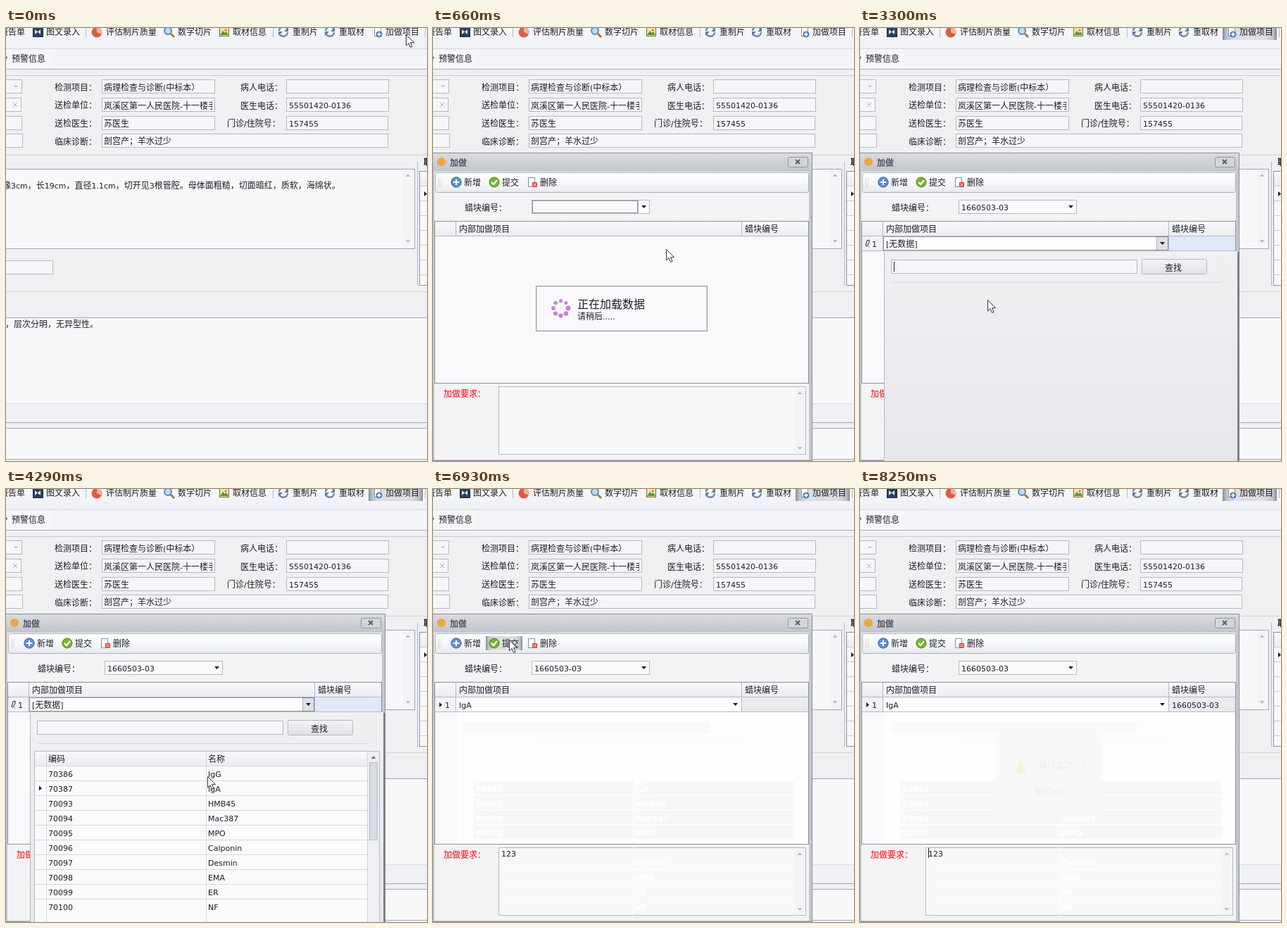
An HTML page for the animation above (8.58 s loop, 598 px wide and 615 px high).

```html
<!DOCTYPE html>
<html lang="zh">
<head>
<meta charset="utf-8">
<style>
html, body { margin: 0; width: 100%; height: 100%; overflow: hidden; background: #f0eff2; }
svg { display: block; }
text { fill: #1c1c26; white-space: pre; font: 12px "Noto Sans CJK SC", "Noto Sans CJK", sans-serif; }
.a { font-family: "DejaVu Sans", sans-serif; font-size: .917em; }
</style>
</head>
<body>
<svg id="stage" width="598" height="615" viewBox="0 0 598 615">
<defs>
  <linearGradient id="bar" x2="0" y2="1"><stop stop-color="#f6f7f9"/><stop offset="1" stop-color="#eff0f4"/></linearGradient>
  <linearGradient id="tool" x2="0" y2="1"><stop stop-color="#fff"/><stop offset=".5" stop-color="#f6f7f9"/><stop offset="1" stop-color="#e8eaef"/></linearGradient>
  <linearGradient id="button" x2="0" y2="1"><stop stop-color="#f3f3f6"/><stop offset="1" stop-color="#dfe1e7"/></linearGradient>
  <linearGradient id="title" x2="0" y2="1"><stop stop-color="#d9dbe0"/><stop offset="1" stop-color="#c2c5cc"/></linearGradient>
  <linearGradient id="head" x2="0" y2="1"><stop stop-color="#f9f9fb"/><stop offset="1" stop-color="#ebecf0"/></linearGradient>
  <linearGradient id="panel" x2="0" y2="1"><stop stop-color="#f0f0f3"/><stop offset="1" stop-color="#e6e7eb"/></linearGradient>
  <linearGradient id="hot"><stop stop-color="#878a92"/><stop offset=".07" stop-color="#bfc2c9"/><stop offset=".22" stop-color="#dcdee3"/><stop offset=".78" stop-color="#dcdee3"/><stop offset=".93" stop-color="#bfc2c9"/><stop offset="1" stop-color="#878a92"/></linearGradient>
</defs>
<g id="scene"></g>
</svg>
<script>
const STEP = 330, STEPS = 26;
const LINE = '#b4b9c4', DARK = '#8b909b', EDGE = '#9ea5b3', INK = '#1c1c26';

const rect = (x, y, w, h, fill, stroke, extra = '') =>
  `<rect x="${stroke ? x + .5 : x}" y="${stroke ? y + .5 : y}" width="${w}" height="${h}" fill="${fill}" ${stroke ? `stroke="${stroke}"` : ''} ${extra}/>`;
const path = (d, stroke, fill = 'none', extra = '') => `<path d="${d}" stroke="${stroke}" fill="${fill}" ${extra}/>`;
const circle = (x, y, r, fill, extra = '') => `<circle cx="${x}" cy="${y}" r="${r}" fill="${fill}" ${extra}/>`;
const hline = (x, x2, y, c = LINE) => rect(x, y, x2 - x, 1, c);
const vline = (x, y, y2, c = LINE) => rect(x, y, 1, y2 - y, c);
const at = (x, y, s) => `<g transform="translate(${x} ${y})">${s}</g>`;
// Text centred vertically on cy, on a whole-pixel baseline; Latin runs use a smaller sans face.
const text = (x, cy, s, style = '') =>
  `<text x="${x}" y="${Math.round(cy + 4.5)}" style="${style}">${s.replace(/[ -~]+/g, m => `<tspan class="a">${m}</tspan>`)}</text>`;
const field = (x, y, w, h = 19) => rect(x, y, w, h, '#f6f6f9', LINE);
const down = (x, y, c = INK, k = 1) => path(`M${x - 3.5} ${y - 2 * k}h7l-3.5 ${4 * k}z`, 'none', c);
const pointer = (x, y) => path(`M${x} ${y - 3.5}v7l4-3.5z`, 'none', INK);
const dotted = (x, y, w, h) => rect(x, y, w, h, 'none', '#333', 'stroke-dasharray="1 1"');
const scroller = (x, y1, y2) => rect(x - 7, y1 - 7, 15, y2 - y1 + 14, '#f4f4f6') + down(x, y1, '#b9bdc6', -1) + down(x, y2, '#b9bdc6');

const refresh = (x, y) => at(x, y,
  path('M-6-1a6 6 0 0 1 11-3M6 1a6 6 0 0 1-11 3', '#7189ad', 'none', 'stroke-width="2.4"') +
  path('M7-6v6h-6zM-7 6v-6h6z', 'none', '#5a78a8'));
const plus = (x, y, r) => circle(x, y, r, '#5b8fd0', 'stroke="#3c67a5"') +
  path(`M${x - r * .6} ${y}h${r * 1.2}M${x} ${y - r * .6}v${r * 1.2}`, '#fff', 'none', 'stroke-width="2"');
const check = (x, y) => circle(x, y, 7, '#78b52c', 'stroke="#4c8317"') +
  path(`M${x - 4} ${y}l3 3l5-6`, '#fff', 'none', 'stroke-width="2.2"');
const pageDelete = (x, y) => rect(x - 6, y - 7, 9, 13, '#fff', '#8190a8') + rect(x, y, 7, 7, '#dc4a3e') +
  path(`M${x + 1.5} ${y + 1.5}l4 4m0-4l-4 4`, '#fff');

function toolbarIcons() {
  return rect(38, -2, 14, 14, '#29405f', '#1d2c44') + path('M41 2l8 7v-7l-8 7z', 'none', '#dfe9f5') +
    circle(129, 6, 7.5, '#d9603f') + path('M129 6V-2a8 8 0 0 1 7 11z', 'none', '#e9b49d') +
    path('M234 8l5 5', '#a87a3c', 'none', 'stroke-width="3"') + circle(230, 4, 5, '#b9dbf4', 'stroke="#6488b4" stroke-width="2"') +
    rect(303, -1, 13, 12, '#f3e6a4', '#7d6a35') + path('M304 10l4-6 3 3 2-2 3 5z', 'none', '#4f9440') + circle(312, 3, 1.5, '#e2692f') +
    refresh(394, 5) + refresh(460, 5) +
    rect(523, -2, 9, 13, '#fff', '#8190a8') + plus(530, 9, 4);
}

function backdrop(hot) {
  let s = rect(0, 0, 598, 615, '#f0eff2') + rect(0, 0, 598, 29, 'url(#bar)') + hline(0, 598, 29, '#d6d9e0') +
    rect(0, 30, 598, 28, '#f3f4f7') + rect(0, 31, 63, 27, '#f6f6f9') + hline(0, 598, 58, '#a4abba');
  if (hot) s += rect(515, 0, 77, 17, 'url(#hot)');
  s += toolbarIcons();
  [[-9, '报告单'], [57, '图文录入'], [142, '评估制片质量'], [244, '数字切片'], [322, '取材信息'], [407, '重制片'], [473, '重取材'], [539, '加做项目']]
    .forEach(([x, w]) => s += text(x, 5.5, w));
  s += vline(113, 0, 13) + vline(379, 0, 13) + vline(595, 0, 13);
  s += text(-4, 43.5, '?', 'fill:#3b79c4;font-weight:bold') + text(8, 43.5, '预警信息');

  s += hline(0, 598, 67, '#c8ccd5');
  [73, 99, 125, 150].forEach((y, i) => s += field(-5, y, [27, 26, 27, 28][i]));
  s += down(14, 83, '#b4b8c0', .6) + path('M10 106l6 6m0-6l-6 6', '#aeb2bb');
  ['检测项目：', '送检单位：', '送检医生：', '临床诊断：'].forEach((w, i) => s += text(69, 84 + 25.8 * i, w));
  [[73, 160], [99, 160], [125, 160], [150, 406]].forEach(([y, w]) => s += field(136, y, w));
  [[73, 145], [99, 145], [125, 144]].forEach(([y, w]) => s += field(398, y, w));
  s += text(139, 84, '病理检查与诊断(中标本）') +
    `<svg x="138" y="98" width="155" height="22">${text(1, 12, '岚溪区第一人民医院-十一楼手')}</svg>` +
    text(139, 135.5, '苏医生') + text(139, 160.5, '剖宫产；羊水过少') +
    text(333, 84, '病人电话：') + text(333, 110, '医生电话：') + text(314, 135.5, '门诊/住院号：') +
    text(402, 109.5, '55501420-0136') + text(402, 135.5, '157455');

  s += hline(0, 598, 180, '#cdd1d9') + vline(584, 190, 366, LINE) + text(593, 190, '取', 'font-weight:bold');
  s += rect(-2, 200, 582, 113, '#f8f8fa', EDGE) + scroller(571, 209, 303) +
    text(-5, 223, '缘3cm，长19cm，直径1.1cm，切开见3根管腔。母体面粗糙，切面暗红，质软，海绵状。');
  s += rect(587, 203, 20, 162, '#f8f8fa', DARK) + rect(588, 204, 10, 20, 'url(#head)');
  for (let y = 224; y < 365; y += 21) s += hline(588, 598, y, '#c5c9d1');
  s += pointer(594, 235.5) + field(-5, 330, 71);
  s += hline(0, 598, 374, '#cdd1d9') + rect(0, 411, 598, 123, '#f8f8fa') + hline(0, 598, 411, EDGE) +
    text(-1, 420.5, '，层次分明，无异型性。');
  s += hline(0, 598, 533, '#d9dde5') + rect(0, 535, 598, 25, '#eff1f5') + hline(0, 598, 560, EDGE) + rect(-2, 568, 602, 44, '#f8f8fa', EDGE);
  return s;
}

function spinner(phase) {
  let s = '';
  for (let k = 0; k < 8; k++) {
    const a = k * Math.PI / 4;
    s += circle(181.5 + 10.5 * Math.sin(a), 398 - 10.5 * Math.cos(a), 3.4 - ((k + phase) % 8) * .13, '#c583d8');
  }
  return s;
}

const loading = phase => rect(146, 366, 243, 64, '#f9f9fb', '#9a9dac') + rect(147, 367, 241, 62, 'none', '#d9dae3') +
  spinner(phase) + text(205, 393, '正在加载数据', 'font-size:16px') + text(205, 409, '请稍后.....');

function blockList(hover) {
  const y = 318 + (hover - 2) * 16;
  let s = rect(143, 267, 216, 157, '#000', '', 'opacity=".28"') + rect(140, 264, 216, 157, '#fafafb', DARK) +
    rect(141, 265, 215, 20, 'url(#head)') + hline(141, 356, 285) + text(145, 275, '蜡块编号');
  s += rect(141, y, 215, 16, '#ededf1') + hline(141, 356, y, '#dcdde3') + hline(141, 356, y + 15, '#dcdde3');
  for (let k = 0; k < 6; k++) s += text(145, 294.5 + 16 * k, `1660503-0${k + 1}`);
  return s + rect(141, 398, 215, 23, '#ebecf0') + path('M149.500 405l7 7m0-7l-7 7', INK, 'none', 'stroke-width="2"') +
    path('M344 419l10-10m-6 10l6-6m-2 6l2-2', '#84878f');
}

const CODES = ['70386', '70387', '70093', '70094', '70095', '70096', '70097', '70098', '70099', '70100'];
const NAMES = ['IgG', 'IgA', 'HMB45', 'Mac387', 'MPO', 'Calponin', 'Desmin', 'EMA', 'ER', 'NF'];
function picker(n) {
  let s = rect(34, 316, 502, 310, 'url(#panel)', LINE) + rect(536, 318, 3, 297, '#7d818b') +
    field(44, 329, 349) + rect(400, 328, 92, 21, 'url(#button)', LINE, 'rx="2"') + text(433, 340, '查找') + hline(45, 514, 361, '#d5d7dd');
  if (n === 10 || n === 11 || n === 14) s += vline(48, 332, 346, INK);
  if (n < 11) return s;
  s += rect(40, 372, 490, 260, '#fafafb', LINE) + rect(41, 373, 489, 20, 'url(#head)') + text(60, 383, '编码') + text(287, 383, '名称');
  for (let k = 0; k < 10; k++) {
    const y = 393 + 21 * k;
    s += hline(41, 513, y, '#d3d6dd') + text(60, y + 11, CODES[k]) + text(287, y + 11, NAMES[k]);
  }
  return s + vline(57, 373, 615, '#d3d6dd') + vline(284, 373, 615, '#d3d6dd') + vline(513, 373, 615, '#d3d6dd') +
    rect(514, 373, 16, 242, '#f0f0f4') + rect(516, 388, 11, 110, '#d9dce3', LINE) + down(522, 381, '#747985', -1) +
    pointer(47, n < 13 ? 404 : 425);
}

// Faint remains of the closed pop-ups.
function residue(last) {
  const white = 'fill:#fff;font-weight:bold';
  let s = rect(34, 317, 499, 187, '#fdfdfe') + rect(45, 330, 348, 18, '#f8f8f9') + hline(140, 438, 361, '#f8f8f9');
  for (let k = 1; k < 10; k++) {
    const y = 393 + 21 * k, low = y > 490;
    if (!low) s += rect(57, y + 1, 456, 19, '#f7f7f8') + text(60, y + 11, CODES[k], white);
    else if (y > 505) s += hline(95, 513, y, '#fcfcfd');
    if (y !== 498) s += text(287, y + 11, NAMES[k], white);
  }
  s += vline(284, 414, 606, '#fcfcfd') + at(287, 409, path('M0 0v13l4-3h5z', '#fff', '#fff'));
  if (last) s += rect(193, 338, 150, 121, '#f8f8f9') + path('M228 383l10 21h-20z', 'none', '#f7f5dc') +
    text(226, 396, '!', 'fill:#e0dfcb') + text(254, 392, '操作成功！！', 'fill:#ececee') + text(247, 429, '确定(O)', 'fill:#ececee');
  return s;
}

function gridRow(n) {
  const editing = n >= 10 && n <= 15;
  let s = rect(3, 296, 29, 20, '#f1f2f5') + rect(33, 296, 405, 20, '#fdfdfe') +
    rect(439, 296, 94, 20, n < 16 ? '#e0e8fb' : '#ebebef') + hline(3, 533, 316) + vline(32, 296, 316) + vline(438, 296, 316);
  if (n >= 10 && n < 15) s += path('M8 309l2-7 3-1 0 3-3 6zM12 311h1', INK) + rect(421, 296, 17, 20, '#dfe1e7', LINE);
  else if (n === 15) s += path('M8 302.500h5m-2.500 0v8m-2.500 0h5', INK);
  else s += pointer(9, 306.5);
  s += text(17, 306.5, '1') + text(37, 306.5, n < 15 ? '[无数据]' : 'IgA');
  if (editing) s += dotted(33, 296, 404, 19);
  if (n >= 10) s += down(429.5, 306);
  if (n === 25) s += text(443, 306.5, '1660503-03');
  return s;
}

function dialog(n) {
  const inactive = n >= 22 && n <= 24;
  let s = rect(-1, 177, 539, 437, '#c3c7cf', DARK) + rect(0, 178, 538, 26, 'url(#title)') +
    circle(12, 190, 6, '#eda73c') + text(24, 191, '加做', `font-weight:bold;fill:${inactive ? '#8b8e96' : '#50545f'}`) +
    rect(504, 183, 28, 14, '#d2d5db', '#8f949f', 'rx="2"') + path('M515 187l6 6m0-6l-6 6', '#5a5e68', 'none', 'stroke-width="2"');
  s += rect(2, 204, 532, 409, '#f3f3f5') + rect(3, 205, 530, 28, 'url(#tool)', '#a9aeb9', 'rx="2"');
  for (let y = 213; y < 226; y += 2) s += rect(8, y, 1, 1, '#a9adb7') + rect(11, y, 1, 1, '#b9bcc4');
  if (n === 21) s += rect(75, 209, 52, 20, 'url(#hot)');
  s += plus(33, 219, 7.2) + check(87, 219) + pageDelete(141, 219) + text(44, 219, '新增') + text(98, 219, '提交') + text(152, 219, '删除');

  s += text(45, 255, '蜡块编号：') + rect(140, 244, 167, 19, '#f9f9fb', LINE);
  if (n === 5 || n === 6) s += rect(291, 245, 16, 18, '#d9dce3', LINE);
  if (n < 5) s += vline(291, 245, 263);
  if (n < 5 || n > 6 && n < 10) s += dotted(141, 245, 149, 17);
  s += down(299.5, 254) + (n > 6 ? text(144, 254.5, '1660503-03') : '');

  s += rect(2, 274, 531, 230, '#f9f9fb', DARK) + rect(3, 275, 530, 20, 'url(#head)') + hline(3, 533, 295) +
    vline(32, 275, 295) + vline(438, 275, 295) + text(37, 285, '内部加做项目') + text(443, 285, '蜡块编号');
  s += text(15, 519, '加做要求：', 'fill:#f00') + rect(93, 509, 436, 96, '#f8f8fa', LINE) + scroller(521, 518, 597);
  if (n >= 15) s += residue(n === 25) + hline(2, 533, 504, DARK);
  if (n >= 7) s += gridRow(n);
  if (n >= 19) s += text(97, 517.5, n === 19 ? '12' : '123');
  const caret = { 16: 97, 17: 97, 19: 111, 20: 118, 25: 97 }[n];
  if (caret) s += vline(caret, 510, 524, INK);
  return s;
}

const message = () => rect(193, 309, 149, 149, '#f0f0f4', DARK) + rect(194, 310, 148, 26, 'url(#title)') +
  text(203, 323, '提示', 'font-weight:bold;fill:#50545f') + path('M325 319l6 6m0-6l-6 6', '#5a5e68', 'none', 'stroke-width="2"') +
  path('M228 383l11 21h-22z', '#c99b1c', '#f5d43c', 'stroke-linejoin="round"') + rect(227, 390, 2, 7, INK) + rect(227, 399, 2, 2, INK) +
  text(254, 392, '操作成功！！') + rect(232, 418, 72, 21, 'url(#button)', LINE, 'rx="2"') + text(247, 429, '确定(O)');

// Cursor position in each step; it is hidden once the list ends.
const CURSOR = [[568, 9], [568, 9], [331, 314], [320, 300], [299, 253], [230, 303], [227, 322], [205, 358], [174, 313], [173, 307],
  [181, 386], [181, 386], [283, 428], [286, 408], [286, 409], [237, 519], [232, 543], [232, 543], [232, 543], [218, 535],
  [126, 231], [108, 214], [234, 314], [291, 386]];
function cursor(n) {
  if (!CURSOR[n]) return '';
  return at(...CURSOR[n], n >= 15 && n <= 19
    ? path('M-3-7.500h2.500l1 1 1-1h2.500M.5-7v14M-3 7.500h2.500l1-1 1 1h2.500', INK)
    : path('M.5.5v15.500l3.600-3.400 2.500 5.800 2.400-1-2.500-5.700h5z', '#30303a', '#fff'));
}

function frame(n) {
  let s = backdrop(n >= 3);
  if (n) s += `<g opacity="${n === 1 ? .3 : 1}">${dialog(n)}</g>`;
  if (n === 2 || n === 3) s += loading(n * 3);
  if (n === 5 || n === 6) s += blockList(n - 4);
  if (n >= 10 && n <= 14) s += picker(n);
  if (n >= 22 && n <= 24) s += `<g opacity="${n === 22 ? .4 : 1}">${message()}</g>`;
  return s + cursor(n);
}

const scene = document.getElementById('scene');
const start = performance.now();
let shown = -1;
function tick() {
  const n = Math.floor((performance.now() - start) / STEP) % STEPS;
  if (n !== shown) scene.innerHTML = frame(shown = n);
  requestAnimationFrame(tick);
}
tick();
</script>
</body>
</html>
```
